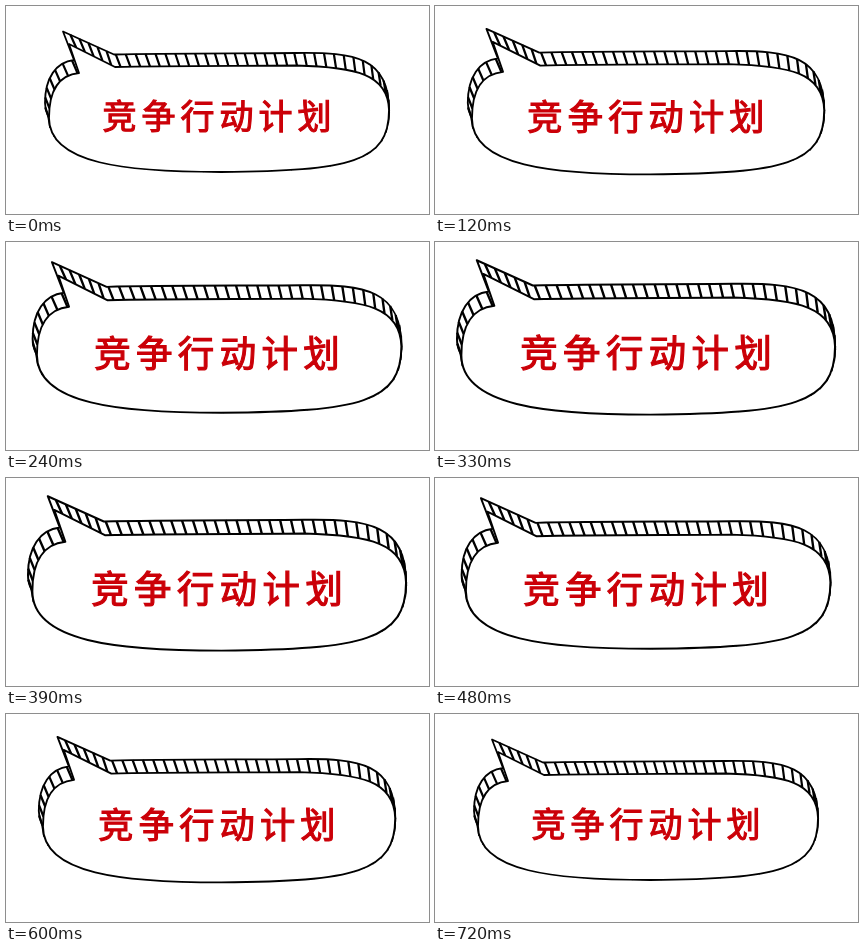
Animation of 423x208 px, one loop 750 ms. Source, as an HTML page:

```html
<!DOCTYPE html>
<html lang="zh-CN">
<head>
<meta charset="utf-8">
<style>
  html, body { margin: 0; width: 100%; height: 100%; overflow: hidden; background: #fff; }
  svg { display: block; width: 100vw; height: 100vh; }
  path { fill: #fff; stroke: #000; stroke-width: 1.8; stroke-linejoin: round; }
  #hatch { stroke-width: 2.2; }
  text {
    font: 400 34px "Noto Sans CJK SC", "Noto Sans CJK", sans-serif; letter-spacing: 5px;
    fill: #cb0008; stroke: #cb0008; stroke-width: 1.1;
  }
</style>
</head>
<body>
<svg viewBox="0 0 423 208">
  <g id="bubble">
    <path id="back" d="M57 25.5 L108 48.5 C160 47 230 47.5 290 47 C350 46 383 52 383 104
      C383 150 345 152 215 153 C120 153 39 138 39 97 C39 72 50 56 68 54 Z"/>
    <path id="hatch"/>
    <path id="front" d="M63 38 L109 61 C160 59.5 230 60 290 59.5 C350 61 382 68 383 104
      C383 156 345 165 215 166 C120 166 43 158 43 112 C43 85 53 69 73 67 Z"/>
    <text x="213.5" y="123" text-anchor="middle">竞争行动计划</text>
  </g>
</svg>
<script>
  const [bubble, back, hatch, front] =
    ['bubble', 'back', 'hatch', 'front'].map(id => document.getElementById(id));
  const STEP = 30, LOOP = 750, HALF = 12, GROWTH = 0.108;
  const CX = 211, CY = 99;

  // Hatching joins the front edge to the raised edge behind it.
  const length = front.getTotalLength(), ratio = back.getTotalLength() / length;
  let lines = '';
  for (let s = 8; s < length - 32; s += 9.8) {
    const a = front.getPointAtLength(s), b = back.getPointAtLength(s * ratio);
    lines += `M${a.x} ${a.y}L${b.x} ${b.y}`;
  }
  hatch.setAttribute('d', lines);

  function draw(now) {
    const step = Math.floor((now % LOOP) / STEP);
    const scale = 1 + GROWTH * (1 - Math.abs(step - HALF) / HALF);
    bubble.setAttribute('transform',
      `translate(${CX} ${CY}) scale(${scale}) translate(${-CX} ${-CY})`);
    requestAnimationFrame(draw);
  }
  draw(0);
</script>
</body>
</html>
```
